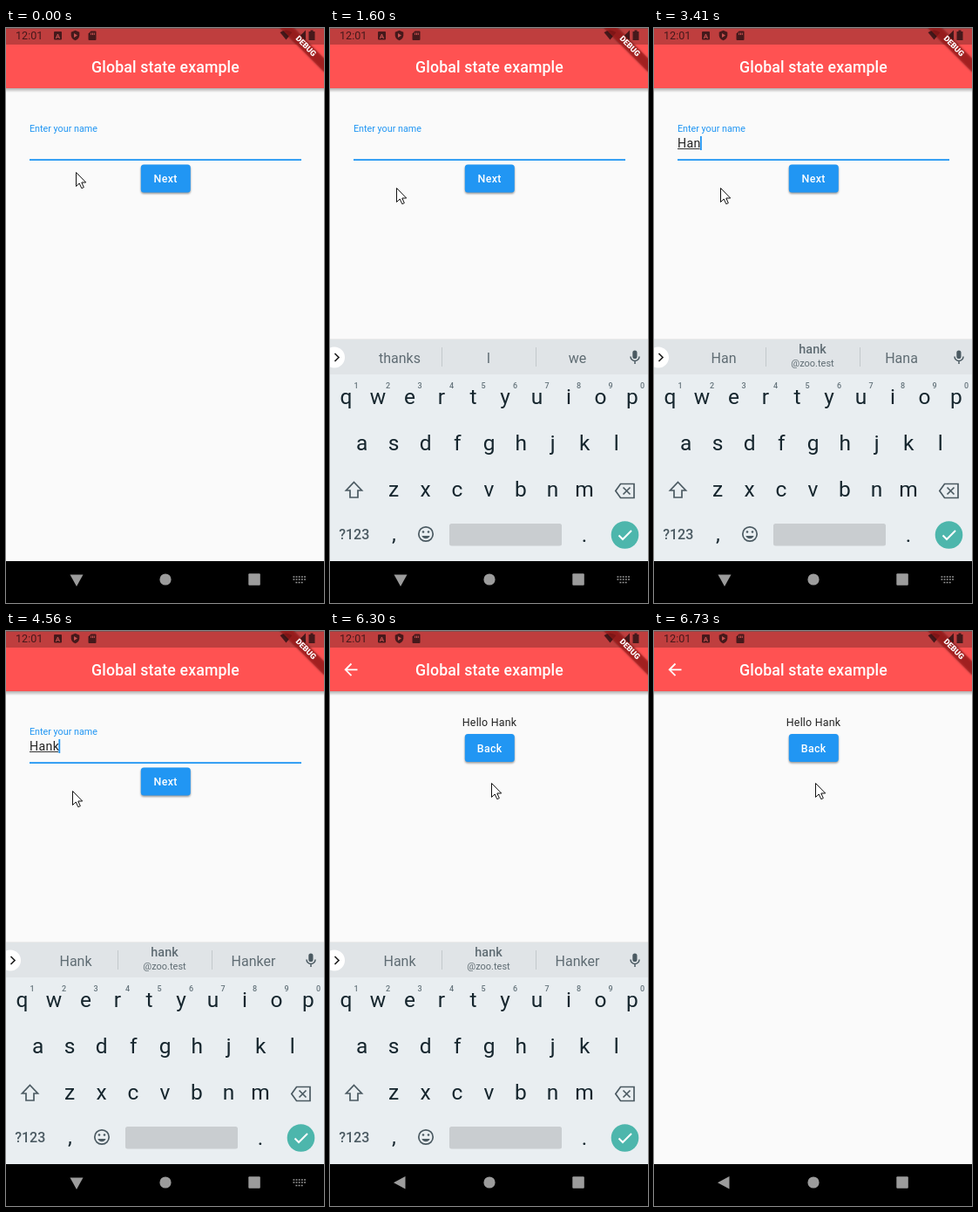
Recreate the animation shown at these times as an HTML page. Size 365x659 px, loop 8000 ms.

```html
<!DOCTYPE html>
<html lang="en">
<head>
<meta charset="utf-8">
<title>Global state example</title>
<style>
html, body { margin: 0; width: 100%; height: 100%; overflow: hidden; background: #fafafa; }
svg { display: block; width: 365px; height: 659px; font-family: Roboto, sans-serif; }
text { white-space: pre; }
.mid { text-anchor: middle; }
.line { fill: none; stroke: #4b5a62; stroke-width: 1.7; }
.key { font-size: 24.5px; fill: #16262e; }
.hint { font-size: 9px; font-weight: 500; fill: #65747c; }
.word { font-size: 16px; fill: #5f6c73; }
.btn { font-size: 12.4px; font-weight: 500; fill: #fff; letter-spacing: .35px; }
</style>
</head>
<body>
<svg viewBox="0 0 365 659">
  <defs>
    <linearGradient id="fade" x2="0" y2="1">
      <stop stop-color="#000" stop-opacity=".3"/>
      <stop offset="1" stop-color="#000" stop-opacity="0"/>
    </linearGradient>
    <filter id="blur" x="-20%" y="-50%" width="140%" height="200%"><feGaussianBlur stdDeviation="1.3"/></filter>
  </defs>
  <rect width="365" height="659" fill="#fafafa"/>

  <!-- App bar -->
  <rect y="69" width="365" height="5" fill="url(#fade)"/>
  <rect width="365" height="69" fill="#ff5252"/>
  <rect width="365" height="19" fill="#bf3e3e"/>
  <rect width="365" height="1" fill="#8a4a4a"/>
  <text class="mid" x="183" y="51" font-size="17.74" font-weight="500" letter-spacing=".13" fill="#fff">Global state example</text>
  <g fill="#45191b">
    <text x="11" y="13.4" font-size="12.6">12:01</text>
    <rect x="55" y="4" width="9" height="9.5" rx="1"/>
    <path d="M79.5 2.8L84.3 4.8V8.5Q84 12.5 79.5 14.3Q75 12.5 74.7 8.5V4.8Z"/>
    <path d="M97.5 3.5H102.5Q103.5 3.5 103.5 4.5V13Q103.5 14 102.5 14H95.5Q94.5 14 94.5 13V6.5Z"/>
    <path d="M314.5 5Q321.5 0 328.5 5L321.5 13.5Z"/>
    <path d="M344 2.5V13.5H333Z"/>
    <path d="M349.5 2.5H352.5V4H354.5V14H347.5V4H349.5Z"/>
  </g>
  <g fill="#c65050">
    <text class="mid" x="59.5" y="11.6" font-size="8" font-weight="700">A</text>
    <path d="M78 6L82 8.5 78 11Z"/>
    <path d="M97.2 5.5h1v2.4h-1zM99 5.5h1v2.4h-1zM100.8 5.5h1v2.4h-1z"/>
  </g>
  <g transform="translate(365 0) rotate(45)">
    <rect x="-36" y="24.8" width="72" height="10.6" opacity=".5" filter="url(#blur)"/>
    <rect x="-36" y="24.8" width="72" height="10.6" fill="#b71c1c" opacity=".63"/>
    <text class="mid" y="32.3" font-size="9.05" font-weight="900" fill="#fff">DEBUG</text>
  </g>

  <!-- First page -->
  <g id="formPage">
    <text x="27" y="119" font-size="10.75" fill="#2196f3">Enter your name</text>
    <text id="typed" x="27" y="137" font-size="14.2" letter-spacing=".35" fill="#222"></text>
    <rect id="composing" x="27" y="138" height="1" fill="#333"/>
    <rect id="caret" y="124" width="1.8" height="16" fill="#2196f3"/>
    <rect x="27" y="150.2" width="312" height="1.8" fill="#2196f3"/>
    <g id="nextButton"></g>
  </g>

  <!-- Second page -->
  <g id="helloPage">
    <path d="M31.5 44.3H18M24.5 37.5L17.7 44.3 24.5 51.1" fill="none" stroke="#fff" stroke-width="1.8"/>
    <text class="mid" x="183" y="109.3" font-size="12.42" letter-spacing=".2" fill="#222">Hello Hank</text>
    <g id="backButton"></g>
  </g>

  <!-- Navigation bar -->
  <rect y="611" width="365" height="48"/>
  <g fill="#9c9c9c">
    <path id="navDown" d="M73.5 626.5H88.5L81 640Z"/>
    <path id="navBack" d="M86.5 625V639.5L73 632.2Z"/>
    <circle cx="183" cy="632" r="6.6"/>
    <rect x="278.3" y="625.3" width="13.5" height="13.5" rx="1"/>
    <path id="navKeys" d="M329.5 629H344M329.5 632H344M332.5 635.5H341" fill="none" stroke="#9c9c9c" stroke-width="1.7" stroke-dasharray="1.8 1.35"/>
  </g>

  <!-- Keyboard -->
  <g id="keyboard">
    <rect y="356" width="365" height="1" opacity=".06"/>
    <rect y="357" width="365" height="254" fill="#e9eef1"/>
    <rect y="357" width="365" height="40" fill="#e0e4e7"/>
    <circle cx="5" cy="377.5" r="12" fill="#fff"/>
    <path class="line" d="M5.5 373L10 377.5 5.5 382" style="stroke:#222"/>
    <path d="M128.5 366V388M236.5 366V388" stroke="#c2c8cb"/>
    <g id="suggestions"></g>
    <rect x="347.3" y="369.5" width="5.2" height="9.5" rx="2.6" fill="#4b5a62"/>
    <path class="line" d="M345 376.5A5 5 0 0 0 355 376.5M350 381.5V385" style="stroke-width:1.5"/>
    <g id="keys"></g>
    <path class="line" d="M27.5 520.5L36.5 530H32V538H23V530H18.5Z"/>
    <path class="line" d="M333.5 522.5H349V538.5H333.5L327.8 530.5ZM336.5 526.5L344.5 534.5M344.5 526.5L336.5 534.5"/>
    <text class="mid" x="27.7" y="586.3" font-size="16" font-weight="500" fill="#4b5a62">?123</text>
    <circle class="line" cx="110" cy="580" r="8.2"/>
    <path d="M105.3 582H114.7Q113 585.3 110 585.3T105.3 582Z" fill="#4b5a62"/>
    <circle cx="107" cy="577.5" r="1.3" fill="#4b5a62"/>
    <circle cx="113" cy="577.5" r="1.3" fill="#4b5a62"/>
    <rect x="137" y="568" width="129" height="25.5" rx="2.5" fill="#c9cdd0"/>
    <circle cx="338.5" cy="581" r="15.8" fill="#4db6ac"/>
    <path d="M331.5 581.5L336 586 346 576" fill="none" stroke="#fff" stroke-width="2"/>
  </g>

  <path id="pointer" d="M.5 .5V16.5L4.2 13 6.8 18.7 9.3 17.6 6.8 12H11.7Z" fill="#fff" stroke="#111"/>
</svg>
<script>
const el = id => document.getElementById(id);
const label = (cls, x, y, text) => `<text class="mid ${cls}" x="${x}" y="${y}">${text}</text>`;

const button = (y, text) => `
  <rect x="154.8" y="${y + 1.6}" width="57" height="32" rx="3.5" opacity=".4" filter="url(#blur)"/>
  <rect x="154.8" y="${y}" width="57" height="32" rx="3.5" fill="#2196f3"/>` +
  label('btn', 183.2, y + 20.6, text);
el('nextButton').innerHTML = button(156.4, 'Next');
el('backButton').innerHTML = button(118, 'Back');

const PITCH = 36.5;
const keyRow = (letters, x, y) =>
  [...letters].map((c, i) => label('key', x + i * PITCH, y, c)).join('');
el('keys').innerHTML =
  keyRow('qwertyuiop', 18.5, 431) + keyRow('asdfghjkl', 36.7, 483.5) + keyRow('zxcvbnm', 73, 536.5) +
  [...'1234567890'].map((c, i) => label('hint', 30 + i * PITCH, 413, c)).join('') +
  label('key', 73.5, 588, ',') + label('key', 292, 588.5, '.');

const email = '<tspan font-size="14.4" font-weight="500" x="182" y="373">hank</tspan>' +
  '<tspan font-size="11" x="182" y="388.3">@zoo.test</tspan>';
const words = list => list.map((w, i) => label('word', 80 + i * 102, 383.7, w)).join('');

// Each track lists [start time, value]; a value holds until the next one.
const tracks = {
  pointer: [[0, [80, 165]], [150, [76, 183]], [5130, [122, 199]], [5260, [168, 197]],
    [5410, [179, 187]], [5530, [184, 178]], [5650, [185, 174]]],
  caret: [[0, 0], [150, 1], [680, 0], [1200, 1], [1600, 0], [2130, 1], [3130, 0], [3410, 1],
    [3980, 0], [4560, 1], [4990, 0], [5530, 1]],
  typed: [[0, ''], [3410, 'Han'], [3550, 'Hank']],
  suggestions: [[0, ['thanks', 'I', 'we']], [2760, []], [2880, ['Thanks', 'I', 'Hello']],
    [3410, ['Han', email, 'Hana']], [3550, ['Hank', email, 'Hanker']]],
  // Keyboard: [vertical offset, opacity]
  keyboard: [[0, [0, 0]], [680, [1.5, .95]], [830, [0, 1]], [6580, [30, .3]], [6730, [0, 0]]],
  page: [[0, 'form'], [6300, 'hello']],
};
const at = (name, t) => tracks[name].findLast(([start]) => start <= t)[1];
const show = (id, on) => el(id).setAttribute('visibility', on ? 'visible' : 'hidden');

const caretX = { '': 27.3, Han: 53, Hank: 60.4 };
let shownWords;

function draw(t) {
  const typed = at('typed', t), onForm = at('page', t) === 'form';
  const [drop, alpha] = at('keyboard', t), list = at('suggestions', t);

  el('pointer').setAttribute('transform', `translate(${at('pointer', t)})`);
  el('typed').textContent = typed;
  el('composing').setAttribute('width', caretX[typed] - 27.3);
  el('caret').setAttribute('x', caretX[typed]);
  el('caret').setAttribute('opacity', at('caret', t));
  el('keyboard').setAttribute('transform', `translate(0 ${drop})`);
  el('keyboard').setAttribute('opacity', alpha);
  if (list !== shownWords) el('suggestions').innerHTML = words(shownWords = list);

  for (const id of ['formPage', 'navDown', 'navKeys']) show(id, onForm);
  for (const id of ['helloPage', 'navBack']) show(id, !onForm);
}

const begin = performance.now();
function tick() {
  draw((performance.now() - begin) % 8000);
  requestAnimationFrame(tick);
}
tick();
</script>
</body>
</html>
```
